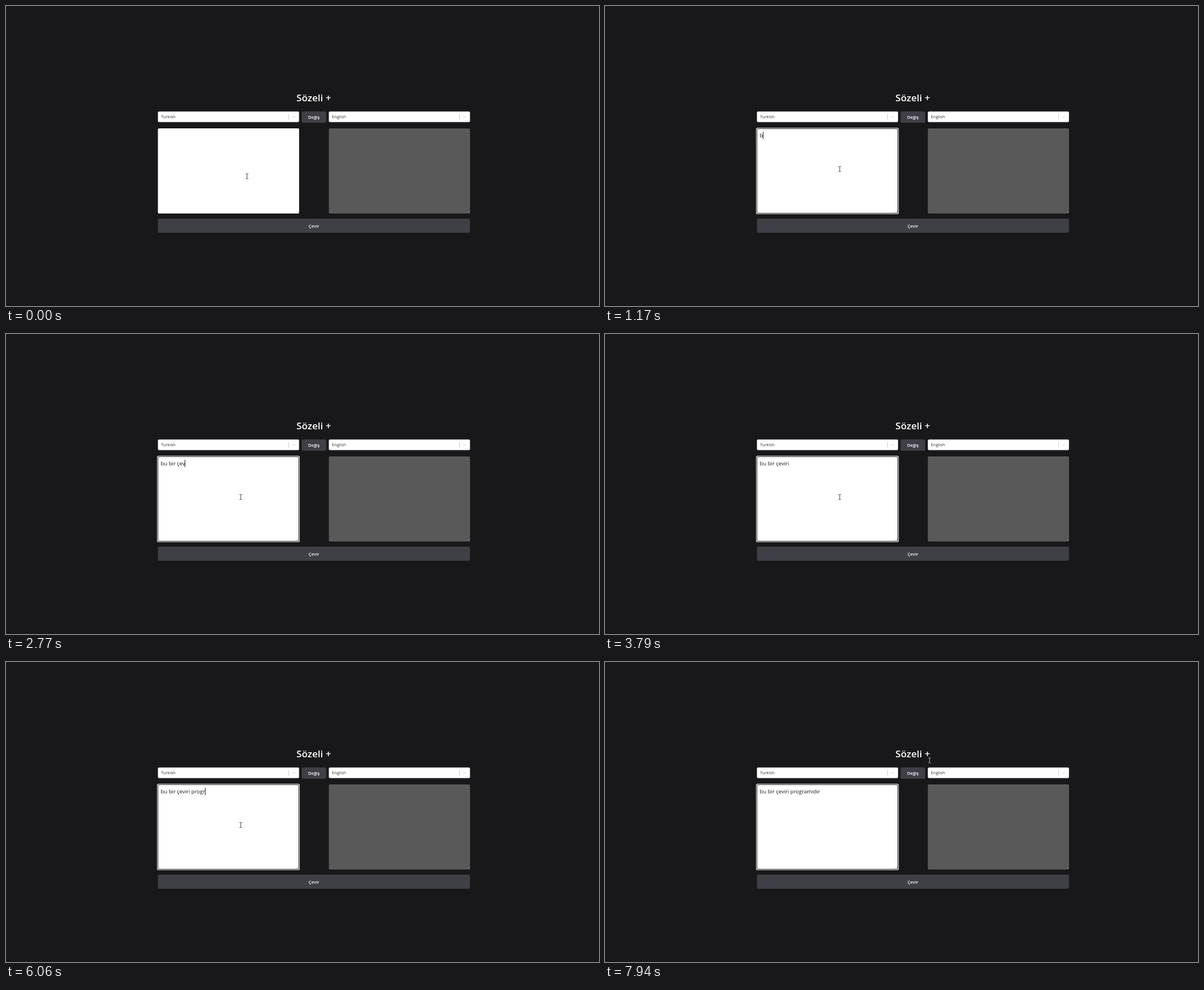
These frames come from a looping animation (1052 px wide and 532 px high, 8000 ms). An HTML page:

```html
<!DOCTYPE html>
<html lang="tr">
<head>
<meta charset="utf-8">
<title>Sözeli +</title>
<style>
  html, body { margin: 0; width: 100%; height: 100%; overflow: hidden; background: #18181b; }
  svg { display: block; width: 1052px; height: 532px; }
  text { font-family: "Open Sans", "Noto Sans", sans-serif; white-space: pre; }
  .title { font-size: 17px; font-weight: 600; fill: #fff; text-anchor: middle; }
  .label { font-size: 7.8px; font-weight: 600; fill: #fff; text-anchor: middle; }
  .option { font-size: 7.6px; fill: #333; }
  .typed { font-size: 9.5px; fill: #18181b; }
  .button { fill: #3f3f46; }
  .box { fill: #fff; stroke: #ccc; stroke-width: .5; }
  .mark { fill: none; stroke: #ccc; stroke-width: 1; }
  .grip { fill: none; stroke: #777; stroke-width: .6; }
</style>
</head>
<body>
<svg viewBox="0 0 1052 532">
  <defs>
    <g id="marks">
      <path class="mark" d="M501.5 191.5V201.5"/>
      <path class="mark" d="M507.8 195.2L510.5 197.9L513.2 195.2"/>
    </g>
    <path id="grip" class="grip" d="M515.2 367.2L519.2 363.2M517.6 367.2L519.2 365.6"/>
  </defs>

  <text class="title" x="546" y="169.3">Sözeli +</text>

  <rect class="box" x="269.7" y="187.2" width="250.1" height="18.6" rx="2"/>
  <use href="#marks"/>
  <text class="option" x="275" y="199.3">Turkish</text>

  <rect class="button" x="524.5" y="187" width="43.5" height="20" rx="2"/>
  <text class="label" x="546.3" y="199.8">Değiş</text>

  <rect class="box" id="target" x="572.9" y="187.2" width="250.1" height="18.6" rx="2"/>
  <use href="#marks" x="303"/>
  <text class="option" x="578" y="199.3">English</text>

  <rect x="269.5" y="217" width="250.5" height="151" rx="2" fill="#fff"/>
  <g id="ring">
    <rect x="268" y="216" width="253" height="153" rx="2.5" fill="#fff"/>
    <rect x="269.5" y="217.5" width="250" height="150" rx="1.5" fill="#fff" stroke="#101010"/>
  </g>
  <use href="#grip"/>
  <text class="typed" id="typed" x="274.6" y="233.3"></text>
  <rect id="caret" y="223" width="1" height="13" fill="#18181b"/>

  <rect x="572.7" y="217" width="250.5" height="151" rx="2" fill="#595959"/>
  <use href="#grip" x="303.2"/>

  <rect class="button" x="269.5" y="377" width="553.7" height="25" rx="2.5"/>
  <text class="label" x="546.3" y="392.5">Çevir</text>

  <g id="pointer">
    <path id="beam" fill="none" stroke-width=".9"
      d="M-2.2 -4.5H-.6L0 -4L.6 -4.5H2.2M0 -4V4M-2.2 4.5H-.6L0 4L.6 4.5H2.2"/>
    <path id="arrow" fill="#fff" stroke="#000" stroke-width=".5"
      d="M0 0V9L2.1 7.1L3.5 10.2L4.9 9.6L3.5 6.6H6.4Z"/>
  </g>
</svg>
<script>
  const LOOP = 8000;
  const FOCUS = 490;
  const PHRASE = "bu bir çeviri programıdır";
  const KEYS = [
    1170, 1370, 1500, 1700, 1830, 1900, 2030,
    2360, 2500, 2770, 2840, 2990, 3120, 3260,
    4790, 4990, 5190, 5860, 6060, 6260, 6460, 6660, 6810, 6940, 7010
  ];
  const CARET_OFF = [[0, FOCUS], [1020, 1170], [3790, 4320], [5790, 5860], [7540, LOOP]];
  // time, x, y, pointer style
  const MOVES = [
    [0, 427.5, 302, "dark"], [70, 427.5, 304, "dark"],
    [290, 425.5, 301, "dark"], [360, 421.5, 295.5, "dark"],
    [430, 418, 291, "dark"], [490, 416.5, 289, "dark"],
    [7610, 428, 280, "dark"], [7670, 463, 254, "dark"],
    [7740, 508, 228, "dark"], [7810, 548, 209, "arrow"],
    [7870, 574, 191, "arrow"], [7940, 575.8, 174.5, "light"]
  ];

  const el = id => document.getElementById(id);
  const show = (id, on) => el(id).setAttribute("visibility", on ? "visible" : "hidden");
  const within = (t, [from, to]) => t >= from && t < to;

  function draw(t) {
    const typed = el("typed");
    typed.textContent = PHRASE.slice(0, KEYS.filter(k => k <= t).length);
    const width = typed.textContent ? typed.getComputedTextLength() : 0;
    el("caret").setAttribute("x", Math.floor(274.6 + width));
    show("caret", !CARET_OFF.some(span => within(t, span)));
    show("ring", t >= FOCUS);

    const [, x, y, style] = MOVES.filter(m => m[0] <= t).pop();
    el("pointer").setAttribute("transform", `translate(${x} ${y})`);
    el("beam").setAttribute("stroke", style === "light" ? "#ccc" : "#333");
    show("beam", style !== "arrow");
    show("arrow", style === "arrow");
    el("target").style.stroke = within(t, [7870, 7940]) ? "#b3b3b3" : "";
  }

  const start = performance.now();
  function tick() {
    draw((performance.now() - start) % LOOP);
    requestAnimationFrame(tick);
  }
  tick();
</script>
</body>
</html>
```
